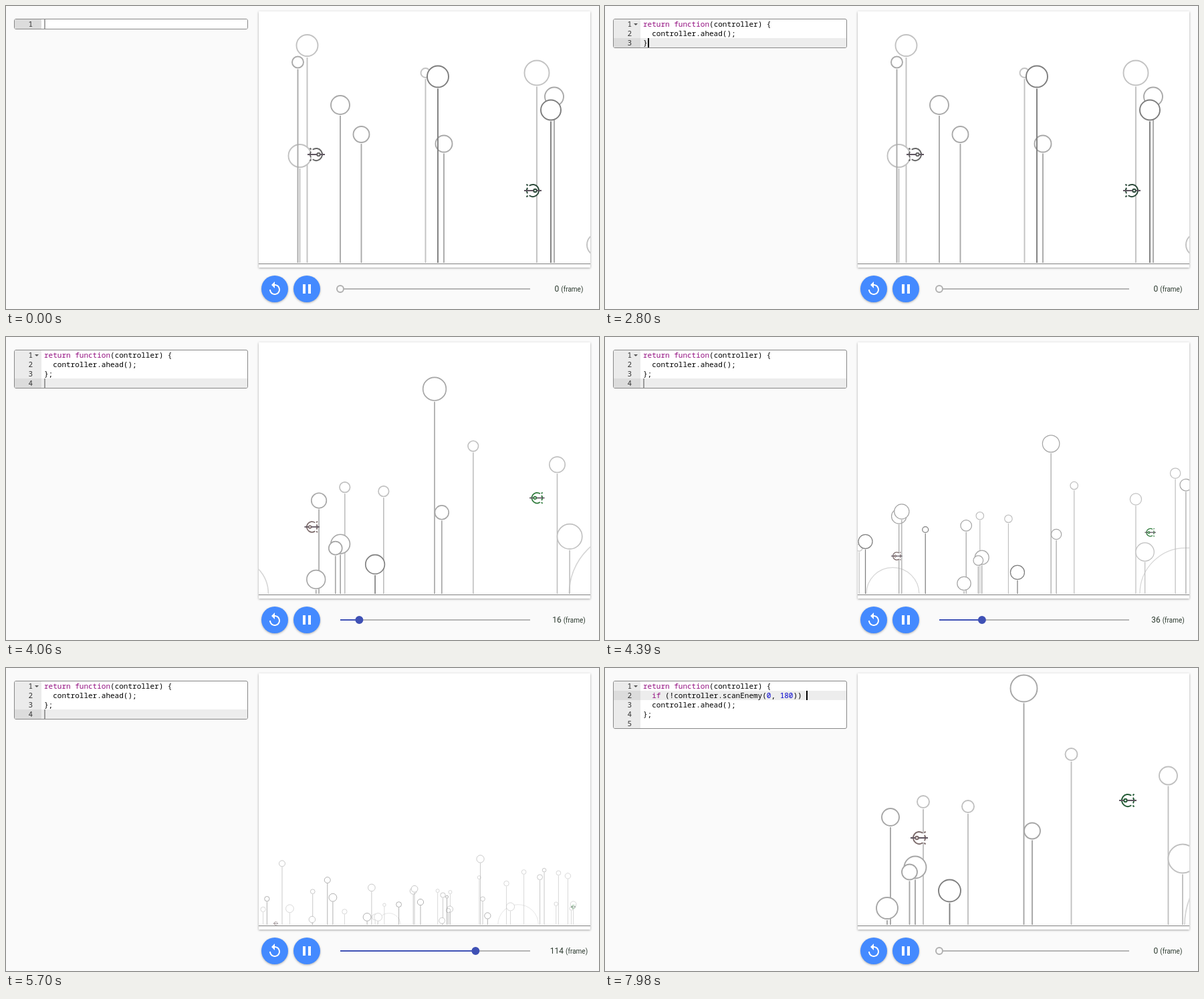
Animation of 887 by 453 pixels, one loop 8000 ms. Source, as an HTML page with a canvas:

```html
<!DOCTYPE html>
<html lang="en">
<head>
<meta charset="utf-8">
<title>Flight script editor</title>
<style>
html, body { margin: 0; width: 100%; height: 100%; overflow: hidden; background: #fafafa; }
#editor { position: absolute; left: 12px; top: 19px; width: 348px; border: 1px solid #888; border-radius: 3px;
  background: #fff; overflow: hidden; font: 11px/14px "Noto Sans Mono", monospace; color: #000; }
.row { position: relative; height: 14px; white-space: pre; padding-left: 44px; }
.gutter { position: absolute; left: 0; top: 0; width: 27px; height: 14px; padding-right: 13px;
  background: #ebebeb; color: #333; text-align: right; }
.active { background: #ededed; }
.active .gutter { background: #dcdcdc; }
.single { background: #fff; }
.fold { position: absolute; left: 30px; top: 6px; border: 3px solid transparent; border-top-color: #555; }
.info { position: absolute; left: 8px; font: italic bold 11px/14px "Liberation Serif", serif; }
.key { color: #930f80; }
.num { color: #0000cd; }
#cursor { position: absolute; width: 2px; height: 14px; background: #000; }
#scene { position: absolute; left: 378px; top: 8px; background: #fff; box-shadow: 0 1px 3px rgba(0,0,0,.35); }
svg { position: absolute; left: 0; top: 0; }
.button { fill: #448aff; filter: drop-shadow(0 1px 1.5px rgba(0,0,0,.3)); }
text { font: 12px Roboto, sans-serif; fill: #2c3a2f; }
.unit { font-size: 10px; }
</style>
</head>
<body>
<div id="editor"><div id="rows"></div><div id="cursor"></div></div>
<canvas id="scene" width="496" height="383"></canvas>
<svg width="887" height="453">
  <circle class="button" cx="402" cy="423" r="20"/>
  <circle class="button" cx="450" cy="423" r="20"/>
  <path fill="#fff" transform="translate(390 411)" d="M12 5V1L7 6l5 5V7c3.31 0 6 2.69 6 6s-2.69 6-6 6-6-2.69-6-6H4c0 4.42 3.58 8 8 8s8-3.58 8-8-3.58-8-8-8z"/>
  <path id="toggle" fill="#fff" transform="translate(438 411)"/>
  <path d="M500 423H784" stroke="#b5b5b5" stroke-width="2"/>
  <path id="progress" stroke="#3f51b5" stroke-width="2"/>
  <circle id="thumb" cy="423" stroke-width="2"/>
  <text x="842" y="427" text-anchor="middle"><tspan id="count">0</tspan> <tspan class="unit">(frame)</tspan></text>
</svg>
<script>
const LOOP = 8000, GROUND = 385, WIDTH = 496;
const LOADED = 3450, STARTED = 3770, REWOUND = 6530;
const $ = id => document.getElementById(id);
const ctx = $('scene').getContext('2d');
const clamp = (v, lo, hi) => Math.min(hi, Math.max(lo, v));

// Layers from back to front; each tree is [x, height, radius] at full zoom.
const layer = (parallax, color, trees) => ({ parallax, color, trees });
const firstScene = [
  layer(0, '#c2c2c2', [[450.5, 326, 16], [439.5, 161, 17], [627.5, 285, 7], [794, 285, 18.5], [886, 28, 17]]),
  layer(31, '#a9a9a9', [[436.5, 301, 8.5], [500, 237, 14], [531.5, 193, 12], [655, 179, 12.5], [820, 249.5, 14]]),
  layer(91, '#7d7d7d', [[646, 279.5, 16], [815, 229.5, 15]])
];
const secondScene = [
  layer(0, '#c0c0c0', [
    [697.5, 256, 9], [842.5, 224, 13.5], [476, 185, 9], [543, 178, 9], [864, 100, 21.5],
    [192, 110, 8], [935.5, 285, 12], [1120, 280, 12], [1107, 115, 10], [-20, 74, 13],
    [143, 45, 16], [159, 45, 21], [1170, 264, 15], [1188, 90, 9], [1199, 113, 16], [1335, 36, 15],
    [-312, 90, 21], [-454, 86, 13], [-729, 131, 17], [-756, 185, 12], [-775, 221, 17]]),
  layer(31, '#a6a6a6', [
    [626.5, 354.5, 20], [639, 141.5, 12], [427, 162, 13], [464, 87, 16.5], [455.5, 80, 11.5], [422, 26, 16],
    [269, 184, 17.5], [275.5, 195, 17.5], [943.7, 257.5, 14], [966.7, 295, 10], [47, 201.5, 19], [1336, 150, 10],
    [-267, 181, 12], [-430, 330, 16], [-644, 93, 20], [-697, 70, 13], [-755, 205, 21], [-270, 32, 17]]),
  layer(91, '#7f7f7f', [
    [515.5, 52, 16.5], [158, 124.5, 16.5], [299, 152.5, 7], [-126.6, 45, 21], [42.6, 112, 14], [1114, 180, 9],
    [-309, 149, 21], [-338, 242, 16], [-660, 142, 13], [-867, 208, 14], [-1095, 199, 17]])
];
const domes = [[286, 62], [975, 108]];

// Horizontal shift of a layer as the camera zooms out.
const project = (x, parallax, zoom) =>
  x * zoom + (714 + parallax - (7.7 + .1 * parallax) * zoom) * (1 - zoom);

function circle(x, y, r, from = 0, to = 2 * Math.PI) {
  ctx.beginPath();
  ctx.arc(x, y, r, from, to);
}

function line(x1, y1, x2, y2) {
  ctx.beginPath();
  ctx.moveTo(x1, y1);
  ctx.lineTo(x2, y2);
  ctx.stroke();
}

function drawTree(x, height, r, zoom) {
  const y = GROUND - height * zoom;
  circle(x, y, r * zoom);
  ctx.fill();
  ctx.stroke();
  line(x, y + (r + 2) * zoom, x, GROUND - 1);
}

function drawCraft(x, height, facing, zoom, color) {
  ctx.save();
  ctx.translate(x, GROUND - height * zoom);
  ctx.scale(zoom * facing, zoom);
  ctx.lineWidth = 2;
  ctx.strokeStyle = color;
  circle(0, 0, 9);
  ctx.fill();
  for (const [from, to] of [[-2.2, 2.2], [2.65, 3.63]]) {
    circle(0, 0, 9, from, to);
    ctx.stroke();
  }
  line(-9.5, -9.5, -7.5, -7.5);
  line(-9.5, 9.5, -7.5, 7.5);
  circle(3.5, 0, 2.2);
  ctx.stroke();
  ctx.strokeStyle = '#5f5560';
  line(-13, 0, 1, 0);
  line(6, 0, 13, 0);
  ctx.restore();
}

function drawScene(t, n) {
  const first = t < LOADED;
  const late = Math.max(0, n - 75);
  const distance = 311 + 13.4 * (n - 16.8 * (1 - Math.exp(-n / 16.8))) - .0209 * late * late;
  const zoom = WIDTH / (distance + 185);

  ctx.setTransform(1, 0, 0, 1, -378, -8);
  ctx.fillStyle = '#fff';
  ctx.fillRect(378, 8, WIDTH, 383);
  ctx.lineWidth = 1.8 * zoom + .1;
  if (!first) {
    ctx.strokeStyle = '#d6d6d6';
    for (const [x, r] of domes) {
      circle(project(x, -28, zoom), GROUND - 1, r * zoom, Math.PI, 2 * Math.PI);
      ctx.stroke();
    }
  }
  for (const { parallax, color, trees } of first ? firstScene : secondScene) {
    ctx.strokeStyle = color;
    for (const [x, h, r] of trees) drawTree(project(x, parallax, zoom), h, r, zoom);
  }
  if (first) {
    drawCraft(464, 163, 1, 1, '#666');
    drawCraft(788, 109, 1, 1, '#2c4a3a');
  } else {
    const fall = Math.max(11, 131 - .717 * n - .01142 * n * n);
    const margin = 92.5 * zoom;
    drawCraft(377.5 + margin, fall, -1, zoom, '#7d6c6c');
    drawCraft(874.5 - margin, 68 + 119 * Math.exp(-n / 85), -1, zoom, t < REWOUND ? '#2d7a3a' : '#245c36');
  }
  ctx.fillStyle = '#808080';
  ctx.fillRect(378, GROUND, WIDTH, 1);
}

const HEADER = 'return function(controller) {';
const CALL = 'controller.ahead();';
const CONDITION = 'if (!controller.scanEnemy(0, 180)) ';
const keys = (t, start, pace) => Math.max(0, Math.floor((t - start) / pace) + 1);

// Brackets the editor closes by itself.
function closers(text) {
  let open = '';
  for (const c of text) {
    if (c === '(') open = ')' + open;
    else if (c === '{') open = '}' + open;
    else if (c === ')' || c === '}') open = open.slice(1);
  }
  return open;
}

function editorState(t) {
  const state = (lines, row, col = lines[row].length) => ({ lines, row, col });
  const call = '  ' + CALL;
  if (t < 1980) {
    const typed = HEADER.slice(0, keys(t, 870, 38.05));
    return state([typed + closers(typed)], 0, typed.length);
  }
  if (t < 2760) {
    const typed = '  ' + CALL.slice(0, keys(t, 2020, 38));
    return state([HEADER, typed + closers(typed), '}'], 1, typed.length);
  }
  if (t < 2850) return state([HEADER, call, '}'], 2);
  if (t < 2990) return state([HEADER, call, '};'], 2);
  if (t < 6900) return state([HEADER, call, '};', ''], t < 6840 ? 3 : 0);
  const count = t < 7650 ? Math.min(21, keys(t, 6950, 30)) : 21 + keys(t, 7650, 25);
  const typed = '  ' + CONDITION.slice(0, count);
  return state([HEADER, typed + closers(typed), call, '};', ''], 1, typed.length);
}

const highlight = text => text.replace(/\b(?:(return|function|if)|\d+)\b/g,
  (word, keyword) => `<span class="${keyword ? 'key' : 'num'}">${word}</span>`);

let shownRows = '';
function drawEditor(t) {
  const { lines, row, col } = editorState(t);
  const html = lines.map((text, i) => {
    const active = i === row ? ' active' : '';
    const single = lines.length === 1 ? ' single' : '';
    const info = i === 0 && t > 1400 && t < 1980 ? '<span class="info">i</span>' : '';
    const fold = text.endsWith('{') ? '<span class="fold"></span>' : '';
    return `<div class="row${active}${single}"><span class="gutter">${info}${i + 1}${fold}</span>${highlight(text)}</div>`;
  }).join('');
  if (html !== shownRows) $('rows').innerHTML = shownRows = html;
  const focused = t >= 680 && t < 3410 || t >= 6840;
  const cursor = $('cursor').style;
  cursor.left = 44 + col * 6.6 + 'px';
  cursor.top = row * 14 + 'px';
  cursor.opacity = focused ? 1 : .35;
}

function drawControls(t, n) {
  const paused = t >= LOADED && t < STARTED;
  const x = 500 + 284 * n / 160;
  const thumb = $('thumb');
  $('toggle').setAttribute('d', paused ? 'M8 5v14l11-7z' : 'M6 19h4V5H6v14zm8-14v14h4V5h-4z');
  $('progress').setAttribute('d', `M500 423H${x}`);
  thumb.setAttribute('cx', x);
  thumb.setAttribute('r', 5);
  thumb.setAttribute('fill', n ? '#3f51b5' : '#fafafa');
  thumb.setAttribute('stroke', n ? '#3f51b5' : '#b0b0b0');
  $('count').textContent = n;
}

const origin = performance.now();
function render() {
  const t = (performance.now() - origin) % LOOP;
  const n = t < REWOUND ? clamp(Math.floor((t - 3785) * .06), 0, 160) : 0;
  drawScene(t, n);
  drawEditor(t);
  drawControls(t, n);
  requestAnimationFrame(render);
}
render();
</script>
</body>
</html>
```
